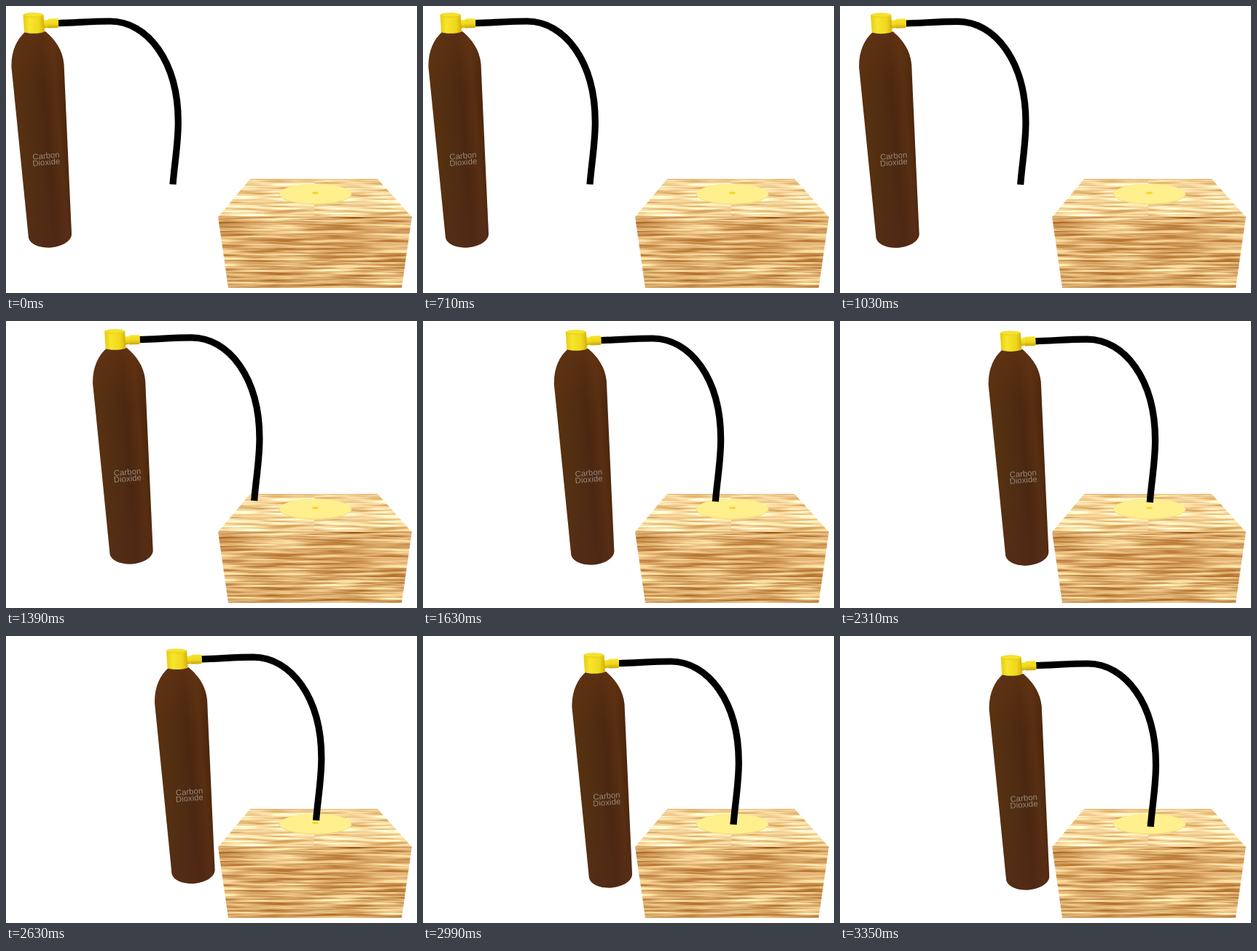
Recreate the animation shown at these times as an HTML page. Size 564 px wide and 395 px high, loop 4.02 s.

```html
<!DOCTYPE html>
<html lang="en">
<head>
<meta charset="utf-8">
<title>Carbon dioxide cylinder</title>
<style>
  html, body { margin: 0; width: 100%; height: 100%; overflow: hidden; background: #fff; }
  svg { position: absolute; left: 0; top: 0; width: 564px; height: 395px; }
  text { font: 11.2px "Liberation Sans", Arial, sans-serif; letter-spacing: .1px; fill: #988a7f; }
</style>
</head>
<body>
<!-- Wooden block -->
<svg viewBox="0 0 564 395">
  <defs>
    <!-- Stretched noise, mapped to shades of brown -->
    <filter id="frontWood" x="0" y="0" width="1" height="1" color-interpolation-filters="sRGB">
      <feTurbulence type="fractalNoise" baseFrequency=".012 .3" numOctaves="3" seed="8"/>
      <feColorMatrix values=".65 0 0 0 .545  .95 0 0 0 .215  1 0 0 0 -.06  0 0 0 0 1"/>
    </filter>
    <filter id="topWood" x="0" y="0" width="1" height="1" color-interpolation-filters="sRGB">
      <feTurbulence type="fractalNoise" baseFrequency=".014 .3" numOctaves="3" seed="21"/>
      <feColorMatrix values=".45 0 0 0 .735  .75 0 0 0 .455  1 0 0 0 .1  0 0 0 0 1"/>
    </filter>
    <linearGradient id="frontTint" x2="0" y2="1">
      <stop offset="0" stop-color="#c87838" stop-opacity="0"/>
      <stop offset=".35" stop-color="#c87838" stop-opacity=".15"/>
      <stop offset=".62" stop-color="#c87838" stop-opacity="0"/>
    </linearGradient>
    <clipPath id="topFace"><path d="M335 238H510L557 290.5H291Z"/></clipPath>
    <clipPath id="frontFace"><path d="M291 290H557L543 388H305Z"/></clipPath>
  </defs>
  <g clip-path="url(#topFace)">
    <rect x="280" y="230" width="144" height="65" filter="url(#topWood)"/>
    <rect x="283" y="227" width="144" height="68" transform="translate(140 3)" filter="url(#topWood)"/>
  </g>
  <g clip-path="url(#frontFace)">
    <rect x="285" y="285" width="280" height="110" filter="url(#frontWood)"/>
    <rect x="285" y="285" width="280" height="110" fill="url(#frontTint)"/>
    <path d="M291 290.5H557M304 387H544" stroke="#a9652c" stroke-opacity=".5"/>
  </g>
  <path d="M335 238.5H510" stroke="#c98d48" stroke-opacity=".5"/>
  <ellipse cx="424.5" cy="259" rx="50" ry="14" fill="#f3d778"/>
  <ellipse cx="424.5" cy="258.5" rx="49.2" ry="13.4" fill="#fff08d"/>
  <ellipse cx="424.5" cy="257.2" rx="4.5" ry="1.7" fill="#f4d72d"/>
</svg>

<!-- Gas cylinder with hose -->
<svg viewBox="0 0 564 395">
  <defs>
    <linearGradient id="body" gradientUnits="userSpaceOnUse" x1="19" y1="200" x2="85" y2="195">
      <stop offset="0" stop-color="#573111"/>
      <stop offset=".35" stop-color="#502d12"/>
      <stop offset=".6" stop-color="#4a2710"/>
      <stop offset=".85" stop-color="#582f12"/>
      <stop offset="1" stop-color="#4b270d"/>
    </linearGradient>
    <linearGradient id="ends" gradientUnits="userSpaceOnUse" x1="0" y1="38" x2="0" y2="332">
      <stop offset="0" stop-color="#663413" stop-opacity=".6"/>
      <stop offset=".25" stop-color="#663413" stop-opacity=".05"/>
      <stop offset=".65" stop-color="#55291a" stop-opacity="0"/>
      <stop offset="1" stop-color="#55291a" stop-opacity=".5"/>
    </linearGradient>
    <linearGradient id="brass">
      <stop offset="0" stop-color="#e6cc12"/>
      <stop offset=".3" stop-color="#f8e62c"/>
      <stop offset=".75" stop-color="#efd61c"/>
      <stop offset="1" stop-color="#cfae0c"/>
    </linearGradient>
    <linearGradient id="pipe" x2="0" y2="1">
      <stop offset="0" stop-color="#f8e62c"/>
      <stop offset=".55" stop-color="#efd61c"/>
      <stop offset="1" stop-color="#c5a40a"/>
    </linearGradient>
    <path id="shell" d="M26 36C15 46 7 62 7.5 84L31 319C33 328 46 333 60 332.5C76 331.5 89.5 324 90 314L79.5 80C77.5 60 67 46 54 35Z"/>
  </defs>
  <g id="rig">
    <use href="#shell" fill="url(#body)"/>
    <use href="#shell" fill="url(#ends)"/>
    <g transform="rotate(-5 55 210)">
      <text x="36.7" y="209.8">Carbon</text>
      <text x="35.8" y="218.8">Dioxide</text>
    </g>
    <path d="M72 23.7C100 22.7 120 21 143 21C194 21 236.3 76 236.3 160C236.3 190 231 218 229 245.5" fill="none" stroke="#000" stroke-width="9.2"/>
    <path d="M51 19.5L58 19V29.5L51 31Z" fill="url(#pipe)"/>
    <path d="M57.5 17.8L71 17Q73 23 71.5 30L57.5 30.5Z" fill="url(#pipe)"/>
    <path d="M23.5 13L25 36C30 38.5 46 38.5 53 35.5L51.5 12Z" fill="url(#brass)"/>
    <ellipse cx="37.5" cy="12.6" rx="14" ry="3.3" fill="#e9d01a"/>
    <ellipse cx="37.5" cy="12.2" rx="12.2" ry="2.4" fill="#f6e22c"/>
  </g>
</svg>

<script>
const LOOP = 4020, START = 710, STEP = 40, END = 3350;
const rig = document.getElementById('rig');

const progress = (t, start, length) => Math.min(1, Math.max(0, (t - start) / length));
const smooth = u => u * u * (3 - 2 * u);
const smoother = u => u * u * u * (10 - 15 * u + 6 * u * u);

function draw() {
  const t = performance.now() % LOOP;
  const held = t < START ? 0 : Math.min(END, START + Math.floor((t - START) / STEP) * STEP);
  // Slide over to the block, then sink into the hole
  const slide = smoother(progress(held, 735, 1220));
  const sink = smooth(progress(held, 2140, 1220));
  rig.setAttribute('transform', `translate(${196.2 * slide + sink} ${3.4 * slide + 13.6 * sink})`);
  requestAnimationFrame(draw);
}
draw();
</script>
</body>
</html>
```
